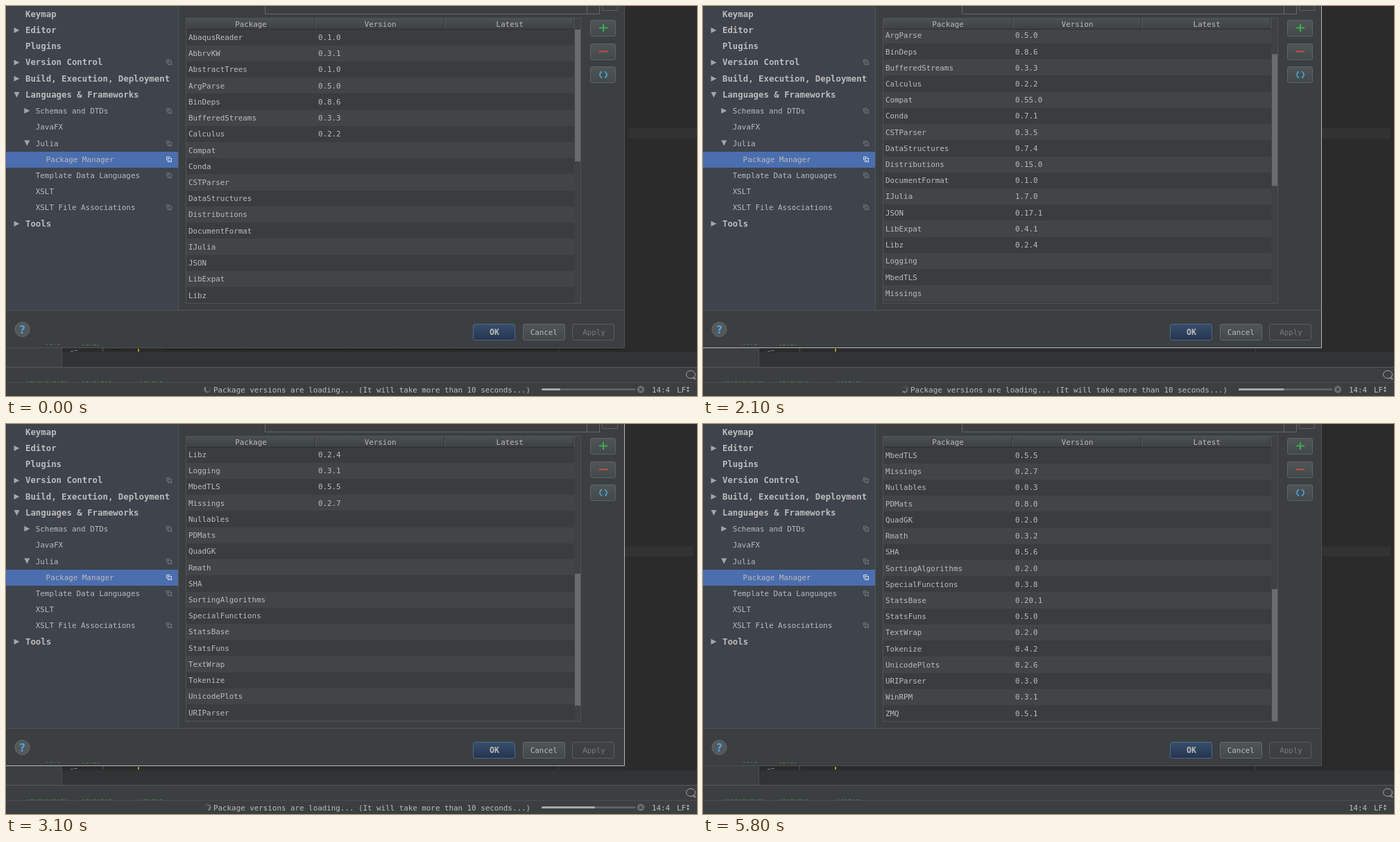
These frames come from a looping animation (996 by 562 pixels, 5.9 s). An HTML page with a canvas:

```html
<!DOCTYPE html>
<html lang="en">
<head>
<meta charset="utf-8">
<title>Package manager</title>
<style>
  html, body { margin: 0; width: 100%; height: 100%; overflow: hidden; background: #3c3f41; }
  canvas { display: block; }
</style>
</head>
<body>
<canvas id="stage" width="996" height="562"></canvas>
<script>
const ctx = document.getElementById('stage').getContext('2d');
const LOOP = 5900, STEP = 100, ROW = 23.22;
const MONO = '"DejaVu Sans Mono", monospace';
const REGULAR = `10.85px ${MONO}`, BOLD = `bold 12.35px ${MONO}`;
const TEXT = '#bbbbbb', PANEL = '#3c3f41';

const packages = `AbaqusReader 0.1.0,AbbrvKW 0.3.1,AbstractTrees 0.1.0,ArgParse 0.5.0,BinDeps 0.8.6,
BufferedStreams 0.3.3,Calculus 0.2.2,Compat 0.55.0,Conda 0.7.1,CSTParser 0.3.5,DataStructures 0.7.4,
Distributions 0.15.0,DocumentFormat 0.1.0,IJulia 1.7.0,JSON 0.17.1,LibExpat 0.4.1,Libz 0.2.4,
Logging 0.3.1,MbedTLS 0.5.5,Missings 0.2.7,Nullables 0.0.3,PDMats 0.8.0,QuadGK 0.2.0,Rmath 0.3.2,
SHA 0.5.6,SortingAlgorithms 0.2.0,SpecialFunctions 0.3.8,StatsBase 0.20.1,StatsFuns 0.5.0,
TextWrap 0.2.0,Tokenize 0.4.2,UnicodePlots 0.2.6,URIParser 0.3.0,WinRPM 0.3.1,ZMQ 0.5.1`
  .split(',').map(entry => entry.trim().split(' '));

// label, depth, arrow (r = closed, d = open), has project icon
const tree = [
  ['Keymap', 0], ['Editor', 0, 'r'], ['Plugins', 0], ['Version Control', 0, 'r', true],
  ['Build, Execution, Deployment', 0, 'r'], ['Languages & Frameworks', 0, 'd'],
  ['Schemas and DTDs', 1, 'r', true], ['JavaFX', 1], ['Julia', 1, 'd', true],
  ['Package Manager', 2, '', true], ['Template Data Languages', 1, '', true],
  ['XSLT', 1], ['XSLT File Associations', 1, '', true], ['Tools', 0, 'r'],
];
const SELECTED = 9;

// [time, value] pairs
const loadedKeys = [[0, 7], [600, 10], [900, 11], [1200, 12], [1800, 16], [2400, 18], [3000, 19],
  [3100, 20], [3600, 24], [4200, 29], [4500, 31], [4800, 33], [5000, 35]];
const scrollKeys = [[1700, 0], [1800, 15.2], [2500, 148.6], [3100, 372.5], [3300, 18 * ROW]];

function sample(keys, t) {
  if (t <= keys[0][0]) return keys[0][1];
  for (let i = 1; i < keys.length; i++) {
    const [t0, v0] = keys[i - 1], [t1, v1] = keys[i];
    if (t <= t1) return v0 + (v1 - v0) * (t - t0) / (t1 - t0);
  }
  return keys[keys.length - 1][1];
}

function rect(x, y, w, h, color) {
  ctx.fillStyle = color;
  ctx.fillRect(x, y, w, h);
}

function label(str, x, y, { color = TEXT, font = REGULAR, align = 'left' } = {}) {
  ctx.font = font;
  ctx.fillStyle = color;
  ctx.textAlign = align;
  ctx.fillText(str, x, y);
}

function path(points, color, width = 1) {
  ctx.beginPath();
  points.forEach(([x, y]) => ctx.lineTo(x, y));
  ctx.strokeStyle = color;
  ctx.lineWidth = width;
  ctx.stroke();
}

function triangle(x, y, dx, dy, size, color) {
  ctx.beginPath();
  ctx.moveTo(x + dx * size, y + dy * size);
  ctx.lineTo(x - dx * size + dy * size, y - dy * size + dx * size);
  ctx.lineTo(x - dx * size - dy * size, y - dy * size - dx * size);
  ctx.fillStyle = color;
  ctx.fill();
}

function gradient(y, h, top, bottom) {
  const g = ctx.createLinearGradient(0, y, 0, y + h);
  g.addColorStop(0, top);
  g.addColorStop(1, bottom);
  return g;
}

function button(x, y, w, h, top, bottom, border) {
  ctx.beginPath();
  ctx.roundRect(x + .5, y + .5, w - 1, h - 1, 2.5);
  ctx.fillStyle = gradient(y, h, top, bottom);
  ctx.fill();
  ctx.strokeStyle = border;
  ctx.lineWidth = 1;
  ctx.stroke();
}

function disc(x, y, r, fill, stroke) {
  ctx.beginPath();
  ctx.arc(x, y, r, 0, 7);
  ctx.fillStyle = fill;
  ctx.fill();
  if (stroke) { ctx.strokeStyle = stroke; ctx.lineWidth = 1; ctx.stroke(); }
}

function drawEditor(focused) {
  rect(0, 0, 996, 562, PANEL);
  rect(80, 493, 916, 28, '#313335');
  rect(892, 0, 104, 498, '#2b2b2b');
  rect(focused ? 892 : 897, 176, 99, 15, '#323232');
  rect(80, 493, 812, 5, '#2b2b2b');
  rect(80, 498, 916, 1, '#292b2c');
  rect(80, 493, 1, 28, '#4a4d4f');
  rect(139, 493, 1, 5, '#55585a');
  rect(796, 493, 1, 5, '#3f4244');
  rect(93, 497, 4, 1, '#77797a');
  rect(98, 496, 5, 1, '#77797a');
  rect(190, 494, 2, 4, '#b09a30');
}

function drawTree() {
  rect(0, 0, 248, 438, '#3e434c');
  rect(248, 0, 1, 438, '#515456');
  tree.forEach(([name, depth, arrow, icon], i) => {
    const y = 11.8 + i * ROW, selected = i === SELECTED;
    if (selected) rect(0, 210, 248, 23, '#4b6eaf');
    const x = 28 + depth * 14.8;
    label(name, x, y + 4, { font: depth ? REGULAR : BOLD });
    if (arrow === 'r') triangle(x - 12.5, y, 1, 0, 4, '#a3a6a9');
    if (arrow === 'd') triangle(x - 12.5, y, 0, 1, 4, '#a3a6a9');
    if (icon) {
      const top = Math.round(y) - 4, color = selected ? '#d5dbe6' : '#74787e';
      ctx.strokeStyle = color;
      ctx.lineWidth = 1;
      ctx.strokeRect(233.5, top + 2.5, 5, 5);
      path([[231.5, top + 5.5], [231.5, top + .5], [236.5, top + .5]], color);
      rect(235, top + 5, 2, 1, color);
    }
  });
}

function drawTable(loaded, scroll) {
  rect(259, 17, 570, 412, '#3f4244');
  ctx.save();
  ctx.beginPath();
  ctx.rect(260, 34, 559, 394);
  ctx.clip();
  packages.forEach(([name, version], i) => {
    const y = 33.5 + i * ROW - scroll;
    if (y < 5 || y > 430) return;
    rect(260, Math.round(y), 560, 24, i % 2 ? '#414547' : '#3a3d3f');
    label(name, 263, y + 15.5);
    if (i < loaded) label(version, 450, y + 15.5);
  });
  ctx.restore();

  rect(260, 18, 559, 15, gradient(18, 15, '#4b5053', '#3d4143'));
  rect(260, 33, 559, 1, '#2d3032');
  for (const x of [446, 632, 818]) {
    rect(x - 1, 18, 1, 15, '#303335');
    rect(x, 18, 1, 15, '#5b5f62');
  }
  ['Package', 'Version', 'Latest'].forEach((name, i) =>
    label(name, 353 + i * 186.6, 29.5, { align: 'center' }));
  rect(820, 34 + scroll * .488, 8, 190, '#696b6d');
  ctx.strokeStyle = '#505355';
  ctx.lineWidth = 1;
  ctx.strokeRect(259.5, 17.5, 569, 411);
}

function drawControls() {
  path([[373.5, 0], [373.5, 11.5], [855.5, 11.5], [855.5, 0]], '#646769');
  path([[837.5, 0], [837.5, 11]], '#646769');
  path([[859.5, 0], [859.5, 6.5], [881.5, 6.5], [881.5, 0]], '#5c5f61');

  for (const y of [20, 54, 87]) button(842, y, 37, 24, '#505557', '#43484a', '#5f6264');
  path([[855, 31.5], [867, 31.5]], '#3faa50', 2);
  path([[861, 26], [861, 37]], '#3faa50', 2);
  path([[855, 65.5], [867, 65.5]], '#c4503f', 2);
  for (const side of [0, Math.PI]) {
    ctx.save();
    ctx.translate(861, 99);
    ctx.rotate(side);
    ctx.beginPath();
    ctx.arc(0, 0, 5, 1.9, 4.3);
    ctx.strokeStyle = '#4a9fd0';
    ctx.lineWidth = 1.8;
    ctx.stroke();
    triangle(-2, -4.5, .7, -.7, 2.8, '#4a9fd0');
    ctx.restore();
  }

  rect(0, 438, 891, 1, '#515456');
  disc(23.5, 466, 10.5, '#53585b', '#65696b');
  label('?', 23.5, 471.5, { color: '#4ba3d9', font: 'bold 15px "DejaVu Sans", sans-serif', align: 'center' });
  button(673, 458, 61, 24, '#384f6b', '#24344f', '#4c688a');
  button(745, 458, 61, 24, '#505557', '#43484a', '#646769');
  button(816, 458, 61, 24, '#3f4244', '#3c3f41', '#595c5e');
  label('OK', 704, 473.5, { font: `bold 11.6px ${MONO}`, align: 'center' });
  label('Cancel', 775.3, 473.5, { align: 'center' });
  label('Apply', 847.5, 473.5, { color: '#777a7c', align: 'center' });
}

function drawDialogEdge(focused, dotted) {
  const color = focused ? '#b4b6b6' : '#4d5052';
  path([[0, 492.5], [891.5, 492.5], [891.5, 0]], color);
  if (dotted) {
    ctx.setLineDash([2, 1]);
    path([[150, 495.5], [170, 495.5]], '#151617');
    path([[228, 495.5], [886, 495.5]], '#151617');
    ctx.setLineDash([]);
  }
}

function drawSpecks() {
  ctx.setLineDash([2, 3, 4, 2]);
  for (const [x0, x1, y] of [[58, 78, 487.5], [110, 134, 488.5], [30, 90, 541.5], [110, 152, 541.5], [194, 226, 541.5]])
    path([[x0, y], [x1, y]], '#4a7a4c');
  ctx.setLineDash([]);
}

function drawStatus(t, loaded) {
  rect(0, 521, 996, 41, PANEL);
  rect(0, 520, 996, 1, '#55585a');
  rect(0, 542, 996, 1, '#4a4d4f');
  ctx.beginPath();
  ctx.ellipse(987, 531, 6.5, 5.5, 0, 0, 7);
  ctx.strokeStyle = '#a0a3a5';
  ctx.lineWidth = 1;
  ctx.stroke();
  path([[989, 536], [994, 538], [992, 534]], '#a0a3a5');
  label('14:4', 931, 556.5);
  label('LF', 967, 556.5);
  triangle(983, 549.8, 0, -1, 1.8, TEXT);
  triangle(983, 555.2, 0, 1, 1.8, TEXT);
  if (t >= 5100) return;

  const lead = t / STEP + 10;
  for (let i = 0; i < 12; i++) {
    const a = i * Math.PI / 6 - Math.PI / 2, age = (lead - i + 12) % 12;
    const c = Math.cos(a), s = Math.sin(a);
    ctx.globalAlpha = Math.max(.08, 1 - age / 8);
    path([[290.5 + c * 2.7, 552.5 + s * 2.7], [290.5 + c * 5.3, 552.5 + s * 5.3]], '#b8babb', 1.1);
  }
  ctx.globalAlpha = 1;
  label('Package versions are loading... (It will take more than 10 seconds...)', 299, 556.5);

  ctx.lineCap = 'round';
  path([[773.5, 552.5], [906, 552.5]], '#5f6264', 3);
  path([[773.5, 552.5], [770.5 + 135 * loaded / packages.length, 552.5]], '#a7a9aa', 3);
  ctx.lineCap = 'butt';
  disc(915, 552.5, 5.2, '#6b6e70');
  path([[913, 550.5], [917, 554.5]], PANEL, 1.2);
  path([[917, 550.5], [913, 554.5]], PANEL, 1.2);
}

function draw(t) {
  const focused = t >= 1500 && t < 5800;
  const loaded = Math.floor(sample(loadedKeys, t) + 1e-6);
  drawEditor(t >= 1500);
  rect(0, 0, 892, 493, PANEL);
  drawTree();
  drawTable(loaded, sample(scrollKeys, t));
  drawControls();
  drawDialogEdge(focused, t < 1500);
  drawStatus(t, loaded);
  drawSpecks();
}

const start = performance.now();
function tick() {
  const t = (performance.now() - start) % LOOP;
  draw(Math.floor(t / STEP) * STEP);
  requestAnimationFrame(tick);
}
tick();
</script>
</body>
</html>
```
